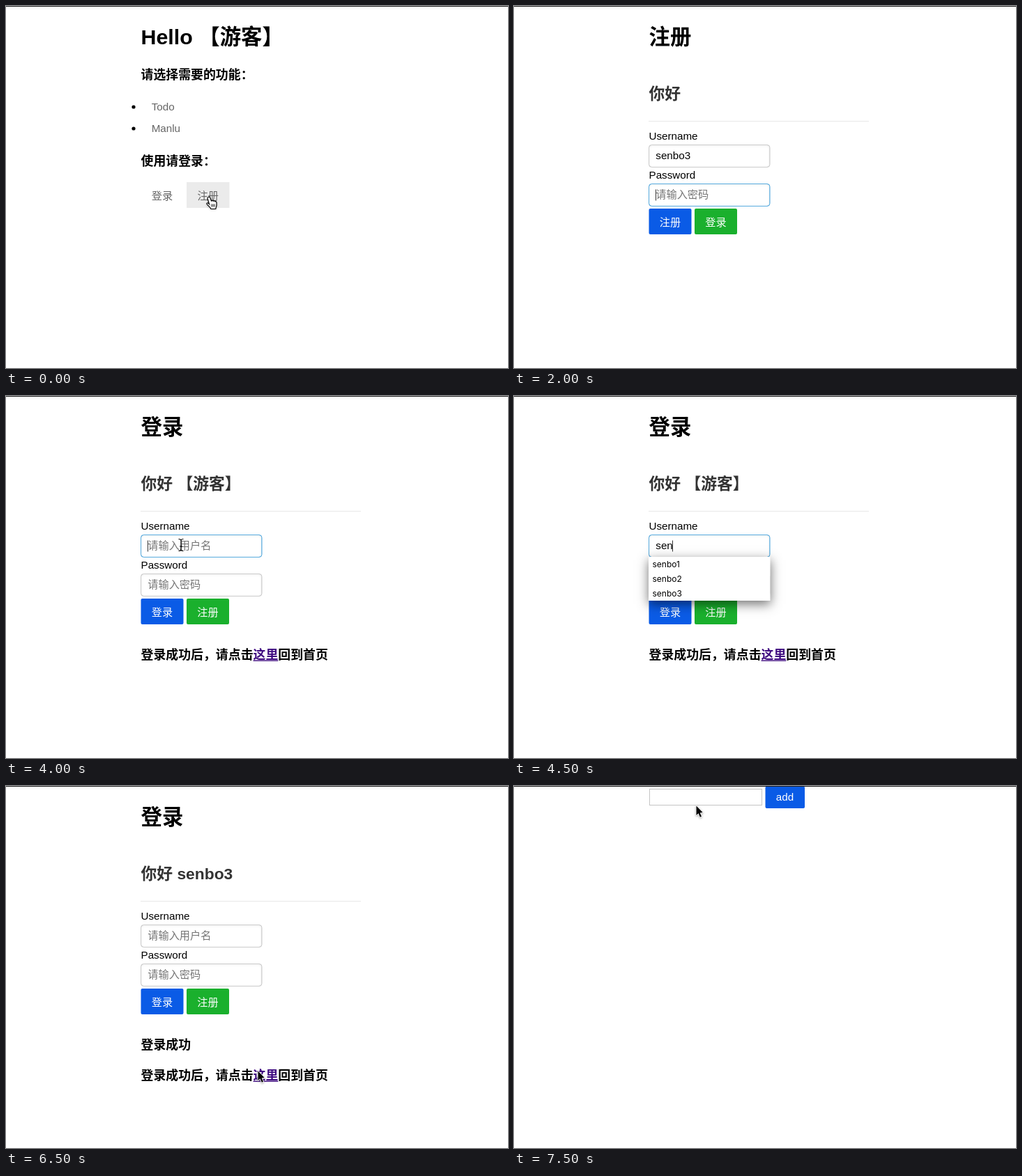
Write an HTML page with a canvas that moves like this. It is 720 by 520 pixels and loops after 8 s.

```html
<!DOCTYPE html>
<html lang="zh-CN">
<head>
<meta charset="utf-8">
<style>
html, body { margin: 0; width: 100%; height: 100%; overflow: hidden; background: #fff; }
canvas { display: block; width: 720px; height: 520px; }
</style>
</head>
<body>
<canvas id="stage" width="720" height="520"></canvas>
<script>
const g = document.getElementById('stage').getContext('2d');
const SANS = '"Liberation Sans", "Noto Sans CJK SC", "Noto Sans CJK", sans-serif';
const LEFT = 193.5, EM = 15.2, STEP = 500;
const BLUE = '#0a5be6', GREEN = '#1ab02d';
const USER = 'senbo3';

function text(s, x, y, size = EM, color = '#000', weight = 400, family = SANS) {
  g.font = `${weight} ${size}px ${family}`;
  g.fillStyle = color;
  g.fillText(s, x, y);
  return x + g.measureText(s).width;
}
const h1 = s => text(s, LEFT, 54.5, 30.4, '#000', 700);
const h2 = s => text(s, LEFT, 134, 22.8, '#333', 700);
const h3 = (s, y, x = LEFT, color) => text(s, x, y, 17.9, color, 700);

function box(x, y, w, h, r, fill) {
  g.beginPath();
  g.roundRect(x, y, w, h, r);
  g.fillStyle = fill;
  g.fill();
}

function button(s, x, color, hover) {
  box(x, 291, 61, 37, 2, color);
  if (hover) {
    const shade = g.createLinearGradient(0, 291, 0, 328);
    shade.addColorStop(0, 'rgba(0,0,0,0)');
    shade.addColorStop(0.4, 'rgba(0,0,0,.05)');
    shade.addColorStop(1, 'rgba(0,0,0,.1)');
    box(x, 291, 61, 37, 2, shade);
  }
  text(s, x + 15.2, 315.6, EM, '#fff');
}

function caret(x, y) {
  g.fillStyle = '#333';
  g.fillRect(x, y, 1, 16);
}

function field(y, hint, value, focus, secret) {
  box(LEFT, y, 173.5, 32, 4, '#fff');
  g.strokeStyle = focus ? '#58acdf' : '#ccc';
  g.lineWidth = 1;
  g.save();
  g.clip();
  g.shadowColor = '#ddd';
  g.shadowBlur = 3;
  g.shadowOffsetY = 1;
  g.stroke();
  g.restore();
  g.stroke();
  let end = 203;
  if (!value) text(hint, 203.3, y + 20.4, EM, '#757575');
  else if (secret) {
    g.fillStyle = '#000';
    for (let i = 0; i < value; i++) {
      g.beginPath();
      g.arc(206 + i * 5.1, y + 14.6, 2.1, 0, 7);
      g.fill();
    }
  } else end = text(value, 203.3, y + 20.8);
  if (focus && !secret) caret(Math.floor(end), y + 8);
}

function suggest(count) {
  g.save();
  g.shadowColor = 'rgba(0,0,0,.55)';
  g.shadowBlur = 15;
  g.shadowOffsetY = 5;
  g.fillStyle = '#fff';
  g.fillRect(193, 231, 174.5, 21 * count);
  g.restore();
  for (let i = 0; i < count; i++)
    text(USER.slice(0, -1) + (i + 1), 198.5, 246 + 21 * i, 12, '#000', 400, 'Inter, sans-serif');
}

const pointers = {
  hand() {
    const p = new Path2D('M3 1.5C4.5 .5 5.6 1.5 6 3L7.5 7C8.5 6 10 6.3 10.3 7.2C11 6.3 12.5 6.5 12.8 7.8' +
      'C14 7.3 15 8 15 9.5L15 13C15 15 14 16 13.8 18.5L7 18.5C6 16 3 14 1 11.5C.5 10 2 9.3 3.5 10.5L4.5 11.5L2.2 4C2 2.8 2 2 3 1.5Z');
    g.fillStyle = '#fff';
    g.fill(p);
    g.shadowColor = 'transparent';
    g.lineWidth = 1.2;
    g.stroke(p);
    g.lineWidth = 0.9;
    g.stroke(new Path2D('M8 11.5V15.5M10 11.5V15.5M12 11.5V15.5'));
  },
  arrow() {
    const p = new Path2D('M0 0L0 13.4L3 10.7L5.4 16.2L7.5 15.3L5.2 9.9L9.2 9.6Z');
    g.lineWidth = 1.8;
    g.lineJoin = 'round';
    g.strokeStyle = '#fff';
    g.stroke(p);
    g.shadowColor = 'transparent';
    g.fillStyle = '#000';
    g.fill(p);
  },
  beam() {
    const p = new Path2D('M-3.5 -8.5Q0 -8.5 0 -6.5Q0 -8.5 3.5 -8.5M0 -7V7M-3.5 8.5Q0 8.5 0 6.5Q0 8.5 3.5 8.5M-2 2H2');
    g.lineWidth = 1.2;
    g.stroke(p);
  }
};

function pointer([kind, x, y]) {
  g.save();
  g.translate(x, y);
  g.strokeStyle = '#000';
  if (kind !== 'beam') {
    g.shadowColor = 'rgba(0,0,0,.35)';
    g.shadowBlur = 3;
    g.shadowOffsetY = 1;
  }
  pointers[kind]();
  g.restore();
}

function home({ user, hover }) {
  h1('Hello ' + (user || '【游客】'));
  h3('请选择需要的功能：', 105);
  if (hover === 'todo') box(LEFT, 125.5, 63.5, 37, 2, '#ebebeb');
  ['Todo', 'Manlu'].forEach((s, i) => {
    g.beginPath();
    g.arc(183, 145 + 31 * i, 2.6, 0, 7);
    g.fillStyle = '#000';
    g.fill();
    text(s, 208.7, 149.5 + 31 * i, EM, '#666');
  });
  if (user) return;
  h3('使用请登录：', 229);
  if (hover === 'join') box(259, 253, 61.5, 37, 0, '#ebebeb');
  text('登录', 208.7, 277.5, EM, '#666');
  text('注册', 274.5, 277.5, EM, '#666');
}

function form({ login, user, name, dots, focus, hover, list, done }) {
  const title = login ? '登录' : '注册';
  h1(title);
  h2(login ? '你好 ' + (user || '【游客】') : '你好');
  g.fillStyle = '#e8e8e8';
  g.fillRect(193, 165, 316, 1);
  text('Username', LEFT, 192);
  field(199.5, '请输入用户名', name, focus === 1);
  text('Password', LEFT, 248);
  field(255.5, '请输入密码', dots, focus === 2, dots);
  button(title, 193.5, BLUE, hover === 1);
  button(login ? '注册' : '登录', 259, GREEN, hover === 2);
  if (done) h3(title + '成功', 377.5);
  if (login) {
    const y = done ? 421.5 : 377.5;
    const a = h3('登录成功后，请点击', y);
    const b = h3('这里', y, a, '#3f0a80');
    g.fillRect(a, y + 2, b - a, 1.4);
    h3('回到首页', y, b);
  }
  if (list) suggest(list);
}

function todo() {
  g.strokeStyle = '#c4c4c4';
  g.lineWidth = 1;
  g.strokeRect(194.5, 4.5, 161, 23);
  box(360.5, 0.5, 56.5, 31.5, 2, BLUE);
  text('add', 375.8, 21, EM, '#fff');
}

const onBlue = ['hand', 219, 314];
const login = { login: true };
const scenes = [
  [home, { hover: 'join' }, ['hand', 287, 273]],
  [form, { focus: 1 }, ['beam', 251, 214]],
  [form, { focus: 1, name: 'sen', list: 2 }],
  [form, { focus: 1, name: 'senbo', list: 2 }],
  [form, { focus: 2, name: USER }],
  [form, { focus: 2, name: USER, dots: 3, hover: 1 }, onBlue],
  [form, { done: true }, ['arrow', 124.5, 214]],
  [form, { done: true, hover: 2 }, ['hand', 288, 328]],
  [form, { ...login, focus: 1 }, ['beam', 251, 214]],
  [form, { ...login, focus: 1, name: 'sen', list: 3 }],
  [form, { ...login, focus: 2, name: USER }],
  [form, { ...login, focus: 2, name: USER, dots: 3, hover: 1 }, onBlue],
  [form, { ...login, user: USER, done: true }, onBlue],
  [form, { ...login, user: USER, done: true }, ['arrow', 361.5, 409.5]],
  [home, { user: USER, hover: 'todo' }, ['hand', 222, 142]],
  [todo, {}, ['arrow', 261.5, 28.5]]
];

const start = performance.now();
function draw() {
  const t = Math.max(0, performance.now() - start) % (scenes.length * STEP);
  const [page, state, cursor] = scenes[Math.floor(t / STEP)];
  g.fillStyle = '#fff';
  g.fillRect(0, 0, 720, 520);
  page(state);
  g.fillStyle = '#222';
  g.fillRect(0, 0, 720, 1);
  if (cursor) pointer(cursor);
  requestAnimationFrame(draw);
}
draw();
</script>
</body>
</html>
```
